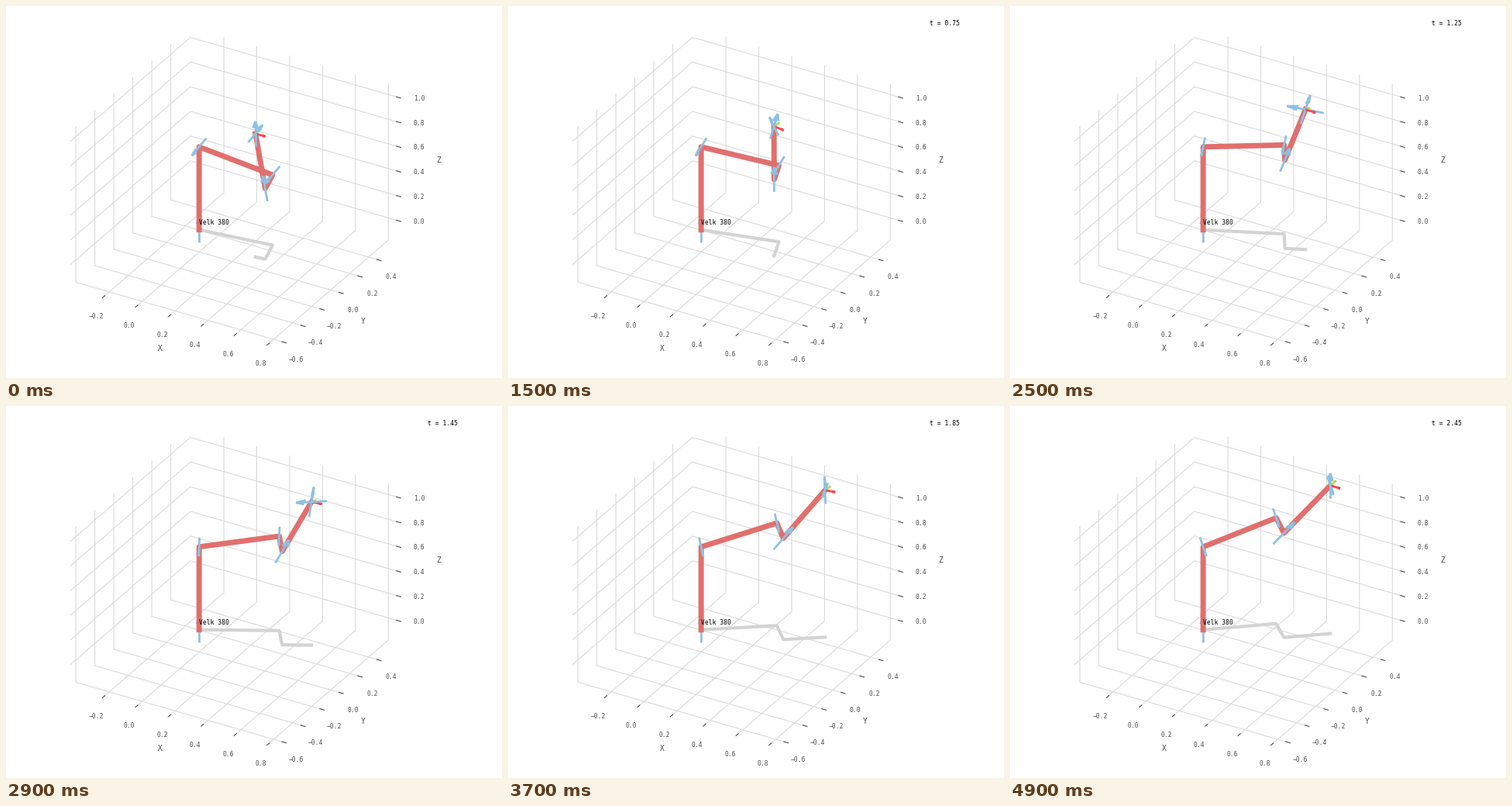
A matplotlib script that plays this animation: 640x480 px, repeating every 5000 ms.

```python
import numpy as np
import matplotlib.pyplot as plt
from matplotlib.animation import FuncAnimation
from matplotlib.collections import LineCollection
from math import acos, asin, atan2, cos, hypot, pi, sin, sqrt

W, H, DPI = 640, 480, 100
FRAMES, INTERVAL, STEP = 50, 100, 0.05

# Orthographic view: azimuth -60, elevation 30, box aspect 4:4:3
SCALE = 245.06
ORIGIN = np.array([294.5, 233.5])
CENTER = np.array([0.227, -0.0235, 0.45])
HALF = 0.6302
RIGHT = np.array([sqrt(3) / 2, 0.5, 0])
DOWN = np.array([0.25, -sqrt(3) / 4, -0.75 * sqrt(3) / 2])
TOWARD = np.array([0.433, -0.75, 0.375])
LOW, HIGH = CENTER - HALF, CENTER + HALF

# Arm dimensions in metres
D1, A2, A3, D3, D4 = 0.6718, 0.4318, 0.0203, 0.15005, 0.4318
LINKS = [(D1, 0, pi / 2), (0, A2, 0), (D3, A3, -pi / 2),
         (D4, 0, pi / 2), (0, 0, -pi / 2), (0, 0, 0)]  # d, a, alpha

AXIS_LENGTH, TOOL_LENGTH = 0.2, 0.06
AXIS_COLOR = "#8FC1E2"
TOOL_COLORS = ["#F84752", "#BADA55", "#54AEFF"]
GRID, TICK = "#dadada", "#4d4d4d"
MONO = dict(family="DejaVu Sans Mono", size=5.8)


def project(points):
    offset = np.asarray(points, float) - CENTER
    return ORIGIN + SCALE * np.stack([offset @ RIGHT, offset @ DOWN], axis=-1)


def upright_pose(x, y, z, flip):
    """Joint angles that put the wrist at x, y, z with the tool unrotated."""
    q1 = atan2(y, x) + asin(D3 / hypot(x, y))
    r, h = sqrt(x * x + y * y - D3 * D3), z - D1
    reach, forearm = hypot(r, h), hypot(A3, D4)
    bend = acos((A2**2 + reach**2 - forearm**2) / (2 * A2 * reach))
    q2 = atan2(h, r) - bend
    q23 = atan2(h - A2 * sin(q2), r - A2 * cos(q2)) - atan2(D4, A3)
    wrist = [-pi, q23, pi - q1] if flip else [0, -q23, -q1]
    return np.array([q1, q2, q23 - q2] + wrist)


def link_matrix(q, d, a, alpha):
    c, s, ca, sa = cos(q), sin(q), cos(alpha), sin(alpha)
    return np.array([[c, -s * ca, s * sa, a * c],
                     [s, c * ca, -c * sa, a * s],
                     [0, sa, ca, d],
                     [0, 0, 0, 1]])


def joint_frames(q):
    frames = [np.eye(4)]
    for angle, link in zip(q, LINKS):
        frames.append(frames[-1] @ link_matrix(angle, *link))
    return frames


def rotate(v, axis, angle):
    return (v * cos(angle) + np.cross(axis, v) * sin(angle)
            + axis * (axis @ v) * (1 - cos(angle)))


def arrow(tail, vector):
    """Shaft and two head strokes, 15 degrees to either side."""
    flat = hypot(vector[0], vector[1])
    if flat > 1e-9:
        axis = np.array([vector[1], -vector[0], 0]) / flat
    else:
        axis = np.array([0.0, 1.0, 0.0])
    tip = tail + vector
    ends = [tail] + [tip - 0.3 * rotate(vector, axis, side * pi / 12)
                     for side in (1, -1)]
    return np.array([[tip, end] for end in ends])


fig = plt.figure(figsize=(W / DPI, H / DPI), dpi=DPI, facecolor="white")
ax = fig.add_axes([0, 0, 1, 1])
ax.set_xlim(0, W)
ax.set_ylim(H, 0)
ax.axis("off")


def draw_axis(index, values, path, outward, shift, name, name_at):
    """Grid lines, ticks and numbers of one axis; path lists (x, y, z) corners."""
    for value in values:
        corners = np.array(path, float)
        corners[:, index] = value
        ax.plot(*project(corners).T, color=GRID, lw=0.8, zorder=0)
        edge = corners[0] if index < 2 else corners[-1]
        out = np.array(outward, float)
        ax.plot(*project([edge - 0.0105 * out, edge + 0.021 * out]).T,
                color=TICK, lw=0.8, zorder=0.5, solid_capstyle="butt")
        x, y = project(edge) + shift
        label = f"{value:.1f}".replace("-", "\u2212")
        ax.text(x, y + 3, label, ha="center", color=TICK, **MONO)
    ax.text(name_at[0], name_at[1] + 4, name, ha="center", color=TICK,
            family=MONO["family"], size=7)


x0, y0, z0 = LOW
x1, y1, z1 = HIGH
draw_axis(0, np.arange(-1, 5) / 5, [(0, y0, z0), (0, y1, z0), (0, y1, z1)],
          (0, -1, 0), (-10.1, 25.4), "X", (199, 441))
draw_axis(1, np.arange(-3, 3) / 5, [(x1, 0, z0), (x0, 0, z0), (x0, 0, z1)],
          (1, 0, 0), (17, 22), "Y", (461, 406))
draw_axis(2, np.arange(0, 6) / 5, [(x0, y0, 0), (x0, y1, 0), (x1, y1, 0)],
          (1, 0, 0), (27.5, 1), "Z", (558, 198))

shadow, = ax.plot([], [], color="lightgrey", lw=3, zorder=2)
robot, = ax.plot([], [], color="#E16F6D", lw=5, zorder=2)
arrows = [ax.add_collection(LineCollection([], colors=color, linewidths=2))
          for color in [AXIS_COLOR] * 6 + TOOL_COLORS]
ax.text(249, 281.5, "Velk 380", color="black", zorder=20, **MONO)
clock = ax.text(544, 25, "", color="black", zorder=20, **MONO)

START = upright_pose(0.4, -0.1, 1.0, flip=True)
END = upright_pose(0.6, 0.3, 1.2, flip=False)


def update(n):
    u = n / (FRAMES - 1)
    ease = u**3 * (10 - 15 * u + 6 * u * u)
    frames = joint_frames(START + ease * (END - START))
    points = np.array([f[:3, 3] for f in frames])
    robot.set_data(*project(points).T)
    shadow.set_data(*project(points * [1, 1, 0]).T)

    shapes = [arrow(p - f[:3, 2] * AXIS_LENGTH / 2, f[:3, 2] * AXIS_LENGTH)
              for p, f in zip(points, frames[:6])]
    shapes += [arrow(points[-1], frames[-1][:3, k] * TOOL_LENGTH)
               for k in range(3)]
    for i, (artist, shape) in enumerate(zip(arrows, shapes)):
        artist.set_segments(project(shape))
        # The base axis lies behind the arm, the others are sorted by depth
        artist.set_zorder(1 if i == 0 else 5 + (shape @ TOWARD).max())

    clock.set_text(f"t = {n * STEP:.2f}" if n else "")
    return [robot, shadow, clock, *arrows]


anim = FuncAnimation(fig, update, frames=FRAMES, interval=INTERVAL,
                     repeat=True, repeat_delay=0)
plt.show()
```
